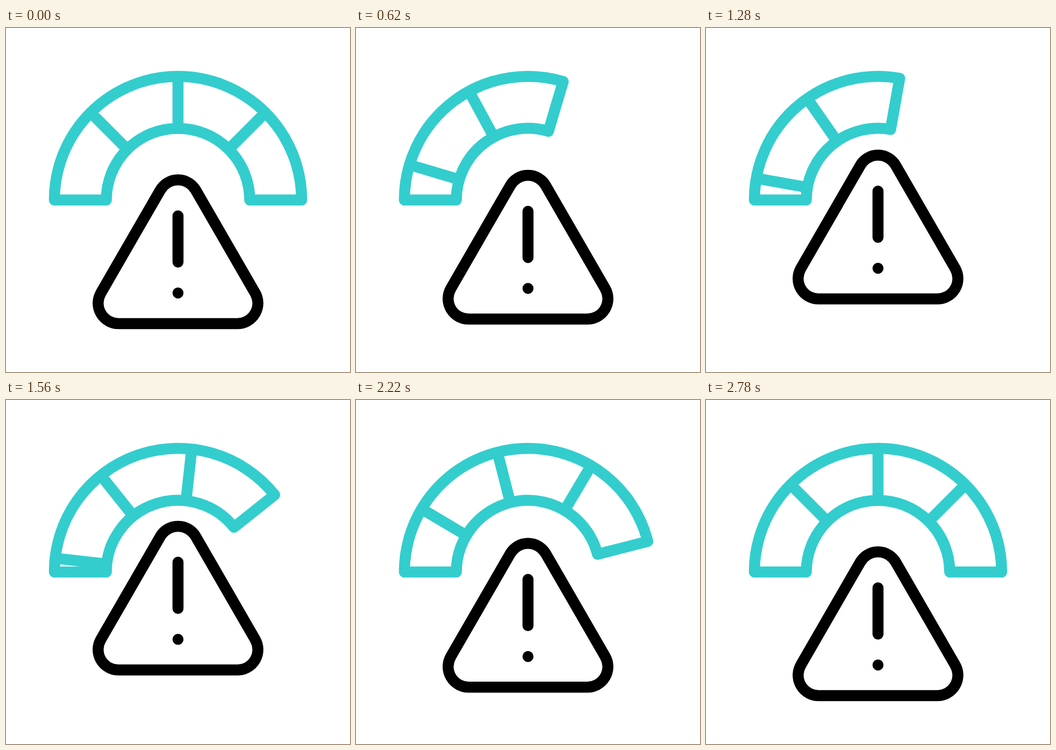
Animation of 640x640 px, one loop 3600 ms. Source, as an HTML page:

```html
<!DOCTYPE html>
<html lang="en">
<head>
<meta charset="utf-8">
<title>Warning gauge</title>
<style>
  html, body { margin: 0; height: 100%; overflow: hidden; background: #fff; }
  svg { display: block; width: 100vw; height: 100vh; }
  path { fill: none; stroke-width: 20.5; stroke-linecap: round; stroke-linejoin: round; }
</style>
</head>
<body>
<svg viewBox="0 0 640 640">
  <path id="gauge" stroke="#33cdcd"/>
  <g id="sign">
    <path stroke="#000" d="M176.5 493 287.1 301.5A38 38 0 0 1 352.9 301.5L463.5 493A38 38 0 0 1 430.6 550H209.4A38 38 0 0 1 176.5 493ZM320 349.5V435.5M320 493h.01"/>
  </g>
</svg>
<script>
const LOOP = 3600, STEP = 20, LIFT = 48;
const OUTER = 230, INNER = 133.4;
const gauge = document.getElementById('gauge');
const sign = document.getElementById('sign');

// Closed form of cubic-bezier(.5, 0, .5, 1) between two times
function ease(t, start, end) {
  const x = Math.min(1, Math.max(0, (t - start) / (end - start)));
  const v = Math.sinh(Math.asinh(4 * x - 2) / 3);
  return 0.5 + 1.5 * v - 2 * v ** 3;
}

// Point on the dial; the angle runs clockwise from the left end
function point(radius, degrees) {
  const a = degrees * Math.PI / 180;
  return `${(320 - radius * Math.cos(a)).toFixed(2)} ${(320 - radius * Math.sin(a)).toFixed(2)}`;
}

function gaugePath(end) {
  let d = `M${point(OUTER, 0)}A${OUTER} ${OUTER} 0 0 1 ${point(OUTER, end)}` +
    `L${point(INNER, end)}A${INNER} ${INNER} 0 0 0 ${point(INNER, 0)}Z`;
  for (let a = end - 45; a > 0.1; a -= 45) d += `M${point(OUTER, a)}L${point(INNER, a)}`;
  return d;
}

function draw(now) {
  const t = Math.floor(now % LOOP / STEP) * STEP;
  const end = 180 - 91 * ease(t, 220, 813) + 76.2 * ease(t, 1020, 1923) + 14.8 * ease(t, 2131, 2747);
  const lift = LIFT * Math.min(ease(t, 223, 1490), 1 - ease(t, 1466, 2747));
  gauge.setAttribute('d', gaugePath(end));
  sign.setAttribute('transform', `translate(0 ${-lift.toFixed(2)})`);
}

const begin = performance.now();
function tick() {
  draw(performance.now() - begin);
  requestAnimationFrame(tick);
}
tick();
</script>
</body>
</html>
```
